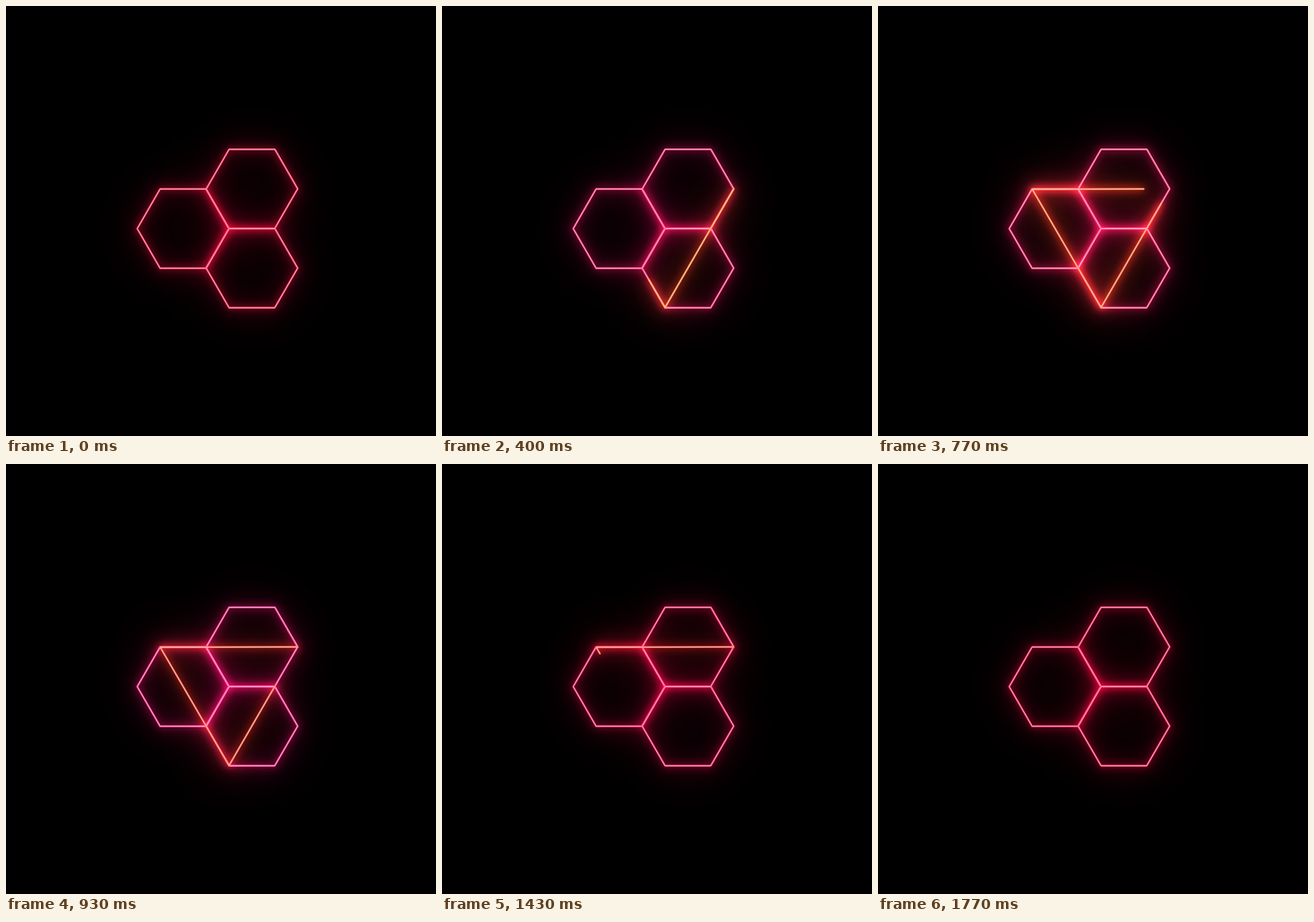
Animation of 480x480 px, one loop 1.81 s. Source, as an HTML page with a canvas:

```html
<!DOCTYPE html>
<html>
<head>
<meta charset="utf-8">
<style>
html, body { margin: 0; width: 100%; height: 100%; overflow: hidden; background: #000; }
canvas { display: block; width: 480px; height: 480px; }
</style>
</head>
<body>
<canvas id="stage" width="480" height="480"></canvas>
<script>
const ctx = document.getElementById('stage').getContext('2d');
const LOOP = 1810, FAR = 2000, R = 51;

const hexagons = [[274.5, 204.2], [197.5, 248.5], [274.5, 292.7]].map(([cx, cy]) => {
  const path = new Path2D();
  for (let i = 0; i < 6; i++) {
    const a = i * Math.PI / 3;
    path.lineTo(cx + R * Math.cos(a), cy + R * Math.sin(a));
  }
  path.closePath();
  return path;
});

const corners = [[325.5, 204.2], [249, 336.6], [172.2, 204.6], [325.5, 204.2]];
const triangle = new Path2D();
corners.forEach(p => triangle.lineTo(...p));
const length = corners.slice(1).reduce(
  (sum, p, i) => sum + Math.hypot(p[0] - corners[i][0], p[1] - corners[i][1]), 0);

// Time, then green and blue; red stays full.
const pink = [[0, 25, 80], [400, 35, 120], [630, 45, 105], [930, 32, 140],
  [1070, 30, 108], [1430, 20, 98], [1770, 18, 85], [LOOP, 25, 80]];
const orange = [[0, 110, 30], [400, 125, 35], [630, 120, 40], [930, 85, 45], [1430, 65, 45], [LOOP, 60, 45]];

function ease(from, to, t) {
  const x = Math.min(1, Math.max(0, (t - from) / (to - from)));
  return x * x * (3 - 2 * x);
}

function tint(keys, t) {
  const i = Math.max(1, keys.findIndex(k => k[0] > t));
  const a = keys[i - 1], b = keys[i];
  const f = (t - a[0]) / (b[0] - a[0]);
  return [255, a[1] + (b[1] - a[1]) * f, a[2] + (b[2] - a[2]) * f];
}

function css(rgb, lift = 0) {
  return `rgb(${rgb.map(v => Math.round(v + (255 - v) * lift)).join(',')})`;
}

function line(path, width, color) {
  ctx.lineWidth = width;
  ctx.strokeStyle = color;
  ctx.stroke(path);
}

// Only the shadow lands on the stage; the stroke itself is drawn outside it.
function glow(path, width, blur, color) {
  ctx.save();
  ctx.globalCompositeOperation = 'lighter';
  ctx.shadowColor = color;
  ctx.shadowBlur = blur;
  ctx.shadowOffsetX = FAR;
  ctx.translate(-FAR, 0);
  line(path, width, '#000');
  ctx.restore();
}

function halo(path, rgb, power) {
  const deep = css([rgb[0], rgb[1] * 0.6, rgb[2] * 0.8]);
  glow(path, 2.2 * power, 52, deep);
  glow(path, 2 * power, 22, deep);
  glow(path, 1.7 * power, 8, deep);
}

function core(path, rgb) {
  line(path, 2, css(rgb, 0.12));
  line(path, 1, css(rgb, 0.65));
}

function draw(t) {
  ctx.setLineDash([]);
  ctx.fillStyle = '#000';
  ctx.fillRect(0, 0, 480, 480);
  ctx.lineJoin = ctx.lineCap = 'round';

  const rose = tint(pink, t), amber = tint(orange, t);
  const flare = Math.exp(-(((t - 650) / 190) ** 2));
  hexagons.forEach(h => halo(h, rose, 1 + 0.25 * flare));
  hexagons.forEach(h => core(h, rose));

  const head = ease(0, 910, t);
  const tail = Math.max(ease(900, 1785, t), ease(660, 930, t) / 9);
  const span = (head - tail) * length;
  if (span > 1) {
    ctx.setLineDash([span, FAR]);
    ctx.lineDashOffset = -tail * length;
    halo(triangle, amber, 1 + flare);
    core(triangle, amber);
  }
}

function tick() {
  draw(performance.now() % LOOP);
  requestAnimationFrame(tick);
}
tick();
</script>
</body>
</html>
```
